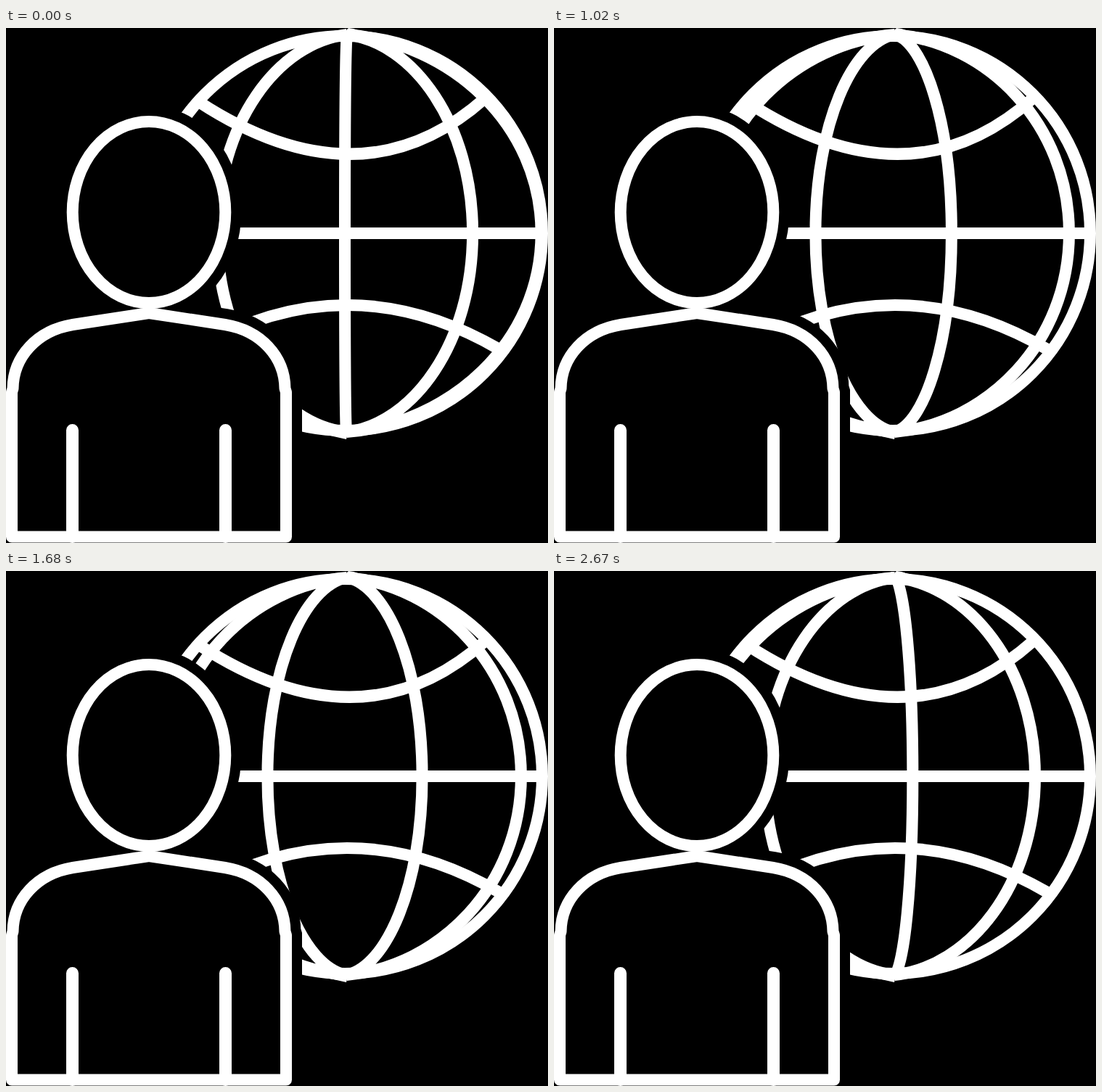
An HTML page that plays this animation: 747x710 px, repeating every 2700 ms.

```html
<!DOCTYPE html>
<html lang="en">
<head>
<meta charset="utf-8">
<title>Person and turning globe</title>
<style>
  html, body { margin: 0; width: 100%; height: 100%; overflow: hidden; background: #000; }
  svg { display: block; width: 747px; height: 710px; fill: none; stroke: #fff; stroke-width: 16; }
  .tip { fill: #fff; stroke: none; }
  .halo { fill: #000; stroke: #000; stroke-width: 44; }
  .person { stroke-linejoin: round; stroke-linecap: round; }
  .arms { stroke-width: 17; }
</style>
</head>
<body>
<svg viewBox="0 0 747 710">
  <defs>
    <g id="figure">
      <ellipse cx="197" cy="254" rx="105.3" ry="125"/>
      <path d="M8 701.5V502L9.5 497C10 453 43 417 92 409L197 393L302 409C351 417 384 453 384.5 497L386 502V701.5Z"/>
    </g>
  </defs>
  <circle cx="467" cy="283" r="272"/>
  <path d="M300 283H739M266 102Q490 248 660 97M260 443Q470 321 680 443"/>
  <path class="tip" d="M465 8L472 0L479 1L494 6ZM438 560L469 567L471 558Z"/>
  <path id="meridians"/>
  <use class="halo" href="#figure"/>
  <g class="person">
    <use href="#figure"/>
    <path class="arms" d="M91.5 554.5V701.5M302.5 554.5V701.5"/>
  </g>
</svg>
<script>
  const STEP = 30, LOOP = 2700, TURN = 15;
  const SPEED = 5.79 * Math.PI / 180;
  const REACH = 15.5;
  const POLE = 469, CENTER = 467, RADIUS = 271;
  const meridians = document.getElementById('meridians');

  // Arc from pole to pole; offset is counted in steps from the middle.
  function meridian(offset) {
    const x = CENTER - RADIUS * Math.sin(offset * SPEED);
    const bend = POLE + 0.53 * (x - POLE);
    return `M${POLE + 1} 9C${bend} 20 ${x} 132 ${x} 283S${bend} 546 ${POLE} 557`;
  }

  function draw(now) {
    const step = Math.floor(now % LOOP / STEP);
    let d = '';
    // Two meridians re-enter from the right on every turn.
    for (const start of [0, -7]) {
      for (let o = start + step; o > -REACH; o -= TURN) {
        if (o < REACH) d += meridian(o);
      }
    }
    // The left one leaves once and rests at the rim for a while.
    if (step < 33) d += meridian(Math.min(7 + step, 13));
    meridians.setAttribute('d', d);
  }

  let begin;
  function tick(now) {
    begin ??= now;
    draw(now - begin);
    requestAnimationFrame(tick);
  }
  draw(0);
  requestAnimationFrame(tick);
</script>
</body>
</html>
```
